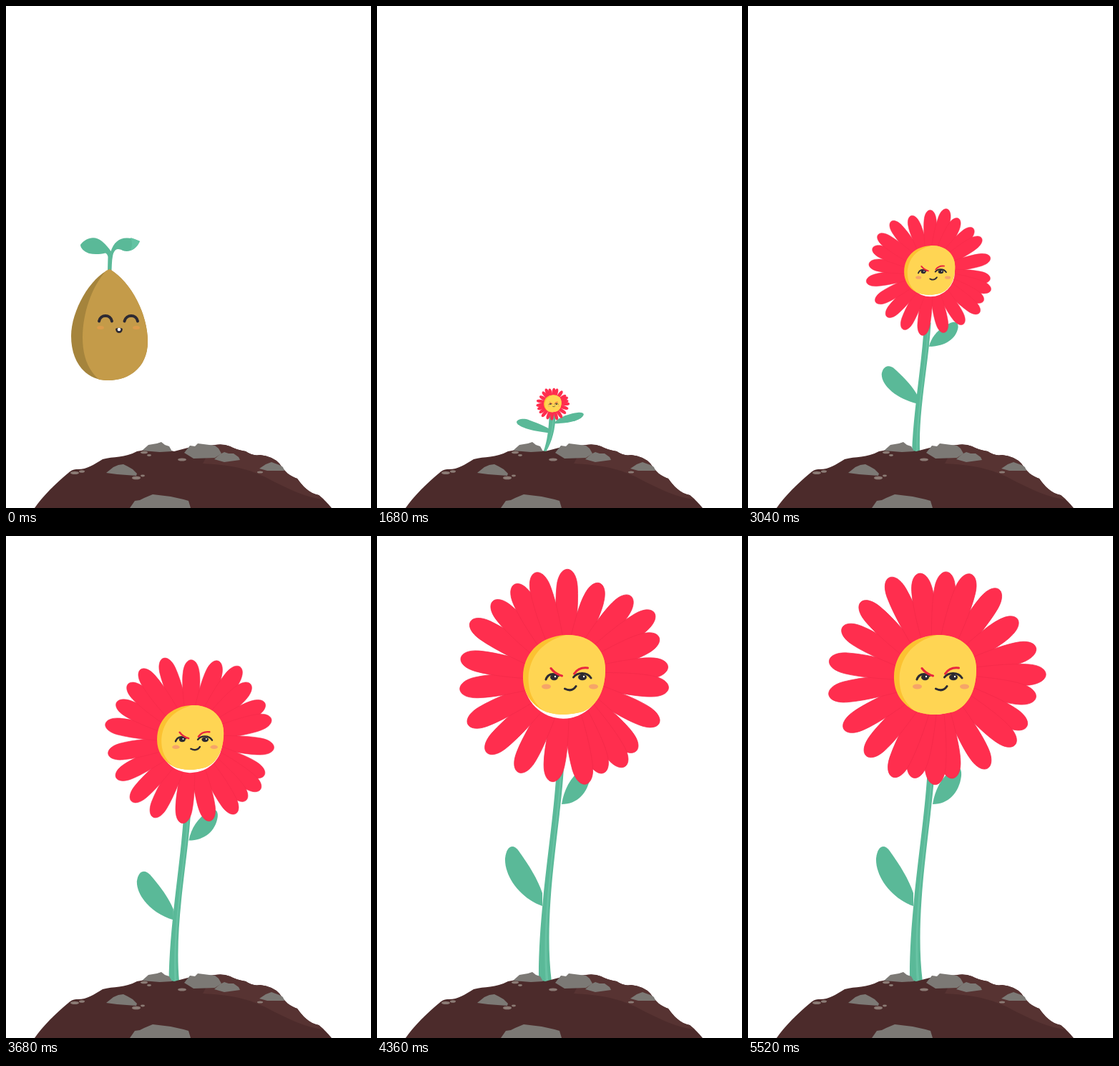
Animation, 510 px wide and 700 px high, one loop 6 s. Source, as an HTML page:

```html
<!DOCTYPE html>
<html lang="en">
<head>
<meta charset="utf-8">
<title>Growing flower</title>
<style>
html, body { margin: 0; width: 100%; height: 100%; overflow: hidden; background: #fff; }
svg { display: block; width: 100%; height: 100%; }
.line { fill: none; stroke: #2d2a32; stroke-linecap: round; }
.brow { fill: none; stroke: #e8263f; stroke-linecap: round; stroke-width: 3; }
.green { fill: #5ab998; }
.rocks { fill: #7c7975; }
.pebbles { fill: #8b7b75; }
</style>
</head>
<body>
<svg viewBox="0 0 510 700">
  <g id="seed">
    <path class="green" d="M142 369L142.500 350Q142 346 139 344.500C132 346 124 347 116 345C108 342 104 337 104 333C112 322 125 320 134 328C140 333 144 338 146.500 342C152 325 165 318 187 328C182 340 172 344 163 341C157 338 153 338 150 345Q148 350 147.500 369Z"/>
    <path fill="#63c3a3" d="M174 323Q181 325 187 328Q183 337 174 341Q178 331 174 323Z"/>
    <path fill="#a5843c" d="M145 367C175 385 198 430 198 468C198 503 173 522 143 522C112 522 91 498 91 460C91 425 118 378 145 367Z"/>
    <path fill="#c49b49" d="M145 367C175 385 198 430 198 468C198 503 173 522 143 522Q136 522 130 521C115 508 107 489 107 462C107 430 119 392 140 369Z"/>
    <ellipse cx="132" cy="448.500" rx="5" ry="2.500" fill="#dc9b4b"/>
    <ellipse cx="182" cy="448.500" rx="5" ry="2.500" fill="#dc9b4b"/>
    <path class="line" stroke-width="4" d="M130 439.500C132 429.500 146 429.500 148 439.500M165.500 439.500C168 429.500 182 429.500 184 439.500"/>
    <path fill="#2d2a32" d="M153 450Q158 447.500 163 450Q162.500 456 158 456Q153.500 456 153 450Z"/>
    <circle cx="158" cy="451" r="2.300" fill="#fff"/>
  </g>

  <g id="flower">
    <path id="leafL" class="green" d="M1 1C.4 .87 -.02 .5 0 .2C.04 -.02 .22 -.05 .36 .07C.66 .33 .87 .55 1 .78Z"/>
    <path id="leafR" class="green" d="M0 1C.08 .62 .3 .28 .7 .06C.92 -.06 1.02 .04 1 .24C.93 .69 .55 1 0 1Z"/>
    <path id="stem" class="green"/>
    <path id="shine" fill="#68c3a4"/>
    <g id="petals" fill="#ff2e4e" stroke="#f32a49" stroke-width=".7"></g>
    <circle id="hole" fill="#fff"/>
    <g id="face">
      <path fill="#fcc231" d="M3 -56C36 -57 58 -36 57.500 -8C57.500 18 48 42 26 51C8 56 -14 57 -30 49C-48 39 -58 22 -57.500 2C-57 -32 -32 -55 3 -56Z"/>
      <path fill="#ffd553" d="M3 -56C36 -57 58 -36 57.500 -8C57.500 18 48 42 26 51C8 56 -14 57 -30 49C-45 36 -50 22 -50 4C-49 -20 -36 -46 3 -56Z"/>
      <ellipse cx="-25" cy="16" rx="6.500" ry="3.400" fill="#f6a568"/>
      <ellipse cx="41" cy="16" rx="6.500" ry="3.400" fill="#f6a568"/>
      <path class="line" stroke-width="3" d="M-25.500 6C-23 -1 -16 -4 -8 1M13 3C18 -4 32 -5 37.500 4M1 19Q11 24 16.500 15.500"/>
      <ellipse cx="-14" cy="3" rx="5.500" ry="4.200" fill="#2d2a32"/>
      <ellipse cx="25.500" cy="3" rx="6" ry="4.200" fill="#2d2a32"/>
      <circle cx="-12.500" cy="2" r="1.200" fill="#fff"/>
      <circle cx="27.500" cy="2" r="1.200" fill="#fff"/>
      <path class="brow" d="M-18.500 -9.500Q-13 -2 -3 1M14 -2C18 -8 25 -11 33 -10"/>
    </g>
  </g>

  <path fill="#4c2b2b" d="M40 700C50 685 70 665 86 652Q92 646 98 646C112 647 122 640 135 632C150 628 166 630 183 621L212 616L235 621L254 616L292 612Q303 610 313 614Q322 619 335 621Q345 628 355 626Q373 628 382 638C391 651 396 655 407 659C414 669 424 680 437 682Q446 689 455 700Z"/>
  <path fill="#573332" d="M288 613Q303 610 313 614Q322 619 335 621Q345 628 355 626Q373 628 382 638C391 651 396 655 407 659C414 669 424 680 437 682L444 688C420 686 396 674 372 662C345 647 320 640 275 638Z"/>
  <g class="rocks">
    <path d="M190 620L199 612 211 610 217 608 222 612 228 614 232 621 215 622Z"/>
    <path d="M249 623L257 613 264 614 268 610 292 613 297 617 301 624 292 630 262 631Z"/>
    <path d="M291 632L299 625 305 622 311 624 318 624 325 629 327 633 305 636Z"/>
    <path d="M140 651L150 643 157 640 164 639 170 642 177 646 183 652 182 655 155 653Z"/>
    <path d="M354 645L363 639 371 636 382 640 387 643 389 648 365 648Z"/>
    <path d="M173 700L180 690 187 689 193 686 205 681 230 684 248 688 255 690 258 700Z"/>
  </g>
  <g class="pebbles">
    <ellipse cx="96" cy="651" rx="6" ry="2"/>
    <ellipse cx="106" cy="649" rx="4" ry="1.800"/>
    <ellipse cx="193" cy="622.500" rx="5" ry="1.800"/>
    <ellipse cx="200" cy="626.500" rx="3" ry="1.400"/>
    <ellipse cx="246" cy="632.500" rx="6" ry="2"/>
    <ellipse cx="182" cy="658" rx="6" ry="2.300"/>
    <ellipse cx="191" cy="655" rx="3" ry="1.400"/>
    <ellipse cx="355" cy="650" rx="4" ry="1.500"/>
  </g>
</svg>
<script>
const LOOP = 6000, STEP = 40;
const HOP = 560, APEX = 760, SPROUT = 1200, GROWN = 4320, STOP = 5520;
const SPIN = 0.0297; // degrees per ms

const $ = id => document.getElementById(id);
const lerp = (a, b, k) => a + (b - a) * k;
const span = (t, a, b) => Math.min(1, Math.max(0, (t - a) / (b - a)));
const inOut = u => (1 - Math.cos(Math.PI * u)) / 2;
const place = (id, value) => $(id).setAttribute('transform', value);

const angles = [0, 19, 38, 53, 66, 83, 95, 115, 135, 145, 157, 168, 186, 205, 225, 243, 262, 279, 299, 315, 330, 343];
const lengths = [151, 140, 146, 154, 143, 145, 146, 147, 144, 151, 145, 153, 148, 149, 153, 152, 149, 149, 154, 147, 148, 152];

$('petals').innerHTML = angles.map((a, i) => {
  const r = lengths[i], y = 24 - r, tip = -r - 7;
  return `<path transform="rotate(${a})" d="M-9 -30C-13 -60 -17 -100 -14.500 ${y}` +
    `C-11.500 ${tip} 11.500 ${tip} 14.500 ${y}C17 -100 13 -60 9 -30Z"/>`;
}).join('');

// Boxes are [x0, y0, x1, y1] as a sprout and fully grown.
const leaves = {
  leafL: [[198, 601.8, 245, 610], [179, 433, 231, 516]],
  leafR: [[245.4, 611, 287, 620], [258, 322, 298, 374]]
};

// Spine control points: sprout x, y, then grown x, y.
const spine = [[234, 622, 235, 622], [244, 622, 228, 520], [243, 625, 252, 405], [243.4, 613, 256, 322]];

function ribbon(points, left, right) {
  const edge = side => points.map(([x, y], i) => `${x + side[i]} ${y}`);
  const a = edge(left), b = edge(right).reverse();
  return `M${a[0]}C${a.slice(1).join(' ')}L${b[0]}C${b.slice(1).join(' ')}Z`;
}

function drawSeed(t) {
  const u = span(t, HOP, SPROUT);
  const x = lerp(145, 242, 1 - (1 - u) ** 2.8);
  const rise = Math.sin(span(t, HOP, APEX) * Math.PI / 2);
  const y = t < APEX ? lerp(322, 239, rise) : lerp(239, 632, inOut(span(t, APEX, SPROUT)));
  place('seed', `translate(${x} ${y}) scale(${1 - 0.304 * u}) translate(-145 -322)`);
}

function drawFlower(t) {
  const k = span(t, SPROUT, GROWN);

  for (const id in leaves) {
    const [x0, y0, x1, y1] = leaves[id][0].map((v, i) => lerp(v, leaves[id][1][i], k));
    place(id, `translate(${x0} ${y0}) scale(${x1 - x0} ${y1 - y0})`);
  }

  const points = spine.map(([x, y, gx, gy]) => [lerp(x, gx, k), lerp(y, gy, k)]);
  const half = [lerp(0.5, 9, k), 3.4, 4.7, lerp(4.3, 5, k)];
  $('stem').setAttribute('d', ribbon(points, half.map(w => -w), half));
  $('shine').setAttribute('d', ribbon(points, half.map(w => w * 0.1), half.map(w => w * 0.5)));

  const x = lerp(242.5, 261.5, k), y = lerp(620, 194, k);
  const turn = (t - GROWN) * SPIN;
  place('petals', `translate(${x + 1.5 * k} ${y + 2.5 * k}) rotate(${turn}) scale(${k})`);

  const size = lerp(0.07, 1, k);
  place('face', `translate(${x} ${y}) scale(${size})`);

  // The ring opening sits slightly off the face until it settles.
  const shift = Math.max(0, k - 0.25) * 8 * (1 - span(t, GROWN, STOP));
  const dir = (turn + 192) * Math.PI / 180;
  const hole = $('hole');
  hole.setAttribute('cx', x + Math.sin(dir) * shift);
  hole.setAttribute('cy', y - Math.cos(dir) * shift);
  hole.setAttribute('r', 55 * size);
}

function draw(ms) {
  const t = Math.min(STOP, Math.floor(ms % LOOP / STEP) * STEP);
  const sprouted = t >= SPROUT;
  $('seed').style.display = sprouted ? 'none' : '';
  $('flower').style.display = sprouted ? '' : 'none';
  if (sprouted) drawFlower(t);
  else drawSeed(t);
}

const start = performance.now();
function tick() {
  draw(performance.now() - start);
  requestAnimationFrame(tick);
}
tick();
</script>
</body>
</html>
```
